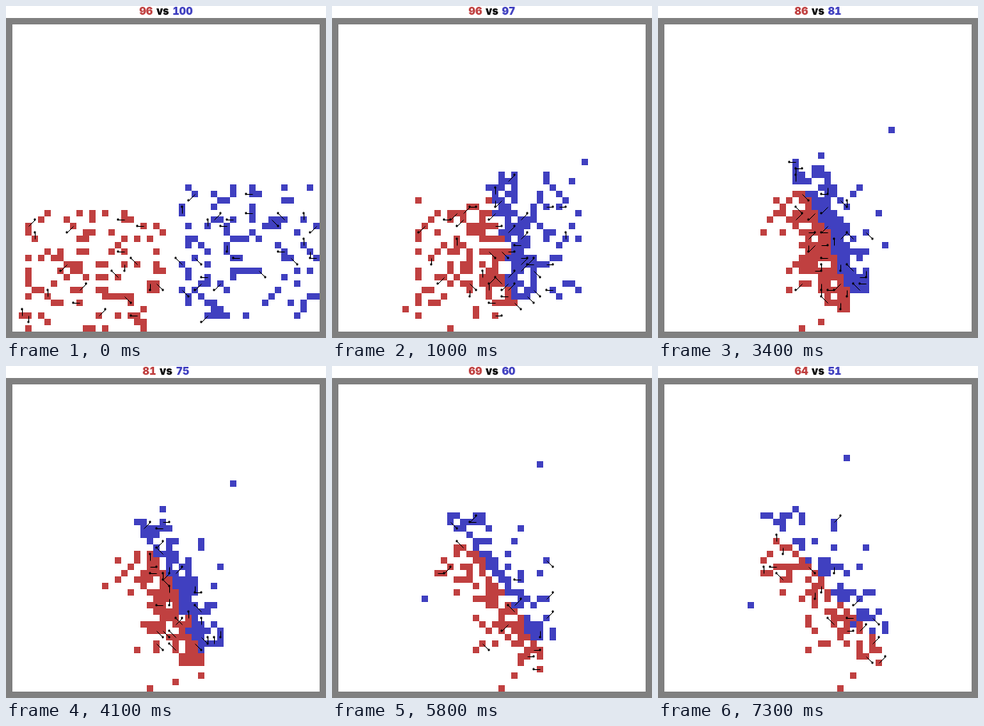
An HTML page for the animation above (7.4 s loop, 400 by 415 pixels).

```html
<!DOCTYPE html>
<html lang="en">
<head>
<meta charset="utf-8">
<title>Red vs blue</title>
<style>
  html, body { margin: 0; width: 100%; height: 100%; overflow: hidden; background: #fff; }
  svg { display: block; width: 100%; height: 100%; }
  text { font: 900 13px Inter, "Liberation Sans", sans-serif; font-variant-numeric: tabular-nums; word-spacing: 1px; }
  .red { fill: #c04040; }
  .blue { fill: #4040c0; }
</style>
</head>
<body>
<svg viewBox="0 0 400 415">
  <text x="200" y="11" text-anchor="middle"><tspan id="redCount" class="red"></tspan> vs <tspan id="blueCount" class="blue"></tspan></text>
  <path d="M0 15H400V415H0ZM8 23V407H392V23Z" fill="#808080" shape-rendering="crispEdges"/>
  <g shape-rendering="crispEdges">
    <path id="red" class="red"/>
    <path id="blue" class="blue"/>
  </g>
  <path id="sticks" fill="none" stroke="#000"/>
  <path id="tips" fill="none" stroke="#000" stroke-width="2.8" stroke-linecap="round"/>
</svg>
<script>
const STEP = 100, STEPS = 74, SIZE = 48, CELL = 8, LEFT = 8, TOP = 23;
const KEYS = [0, 10, 21, 34, 49, 58, 73];

// Starting areas are in cells; counts are the survivors at each key step.
const TEAMS = [
  { id: 'red', side: 1, area: [1, 29, 23, 19], counts: [96, 96, 90, 86, 75, 69, 64] },
  { id: 'blue', side: -1, area: [26, 25, 22, 21], counts: [100, 97, 91, 81, 68, 60, 51] }
];

let seed = 20117;
function rand() {
  seed = (seed + 0x6d2b79f5) | 0;
  let v = Math.imul(seed ^ (seed >>> 15), 1 | seed);
  v = (v + Math.imul(v ^ (v >>> 7), 61 | v)) ^ v;
  return ((v ^ (v >>> 14)) >>> 0) / 4294967296;
}
const pick = n => Math.floor(rand() * n);

const taken = new Set();
const key = (x, y) => y * SIZE + x;

function deploy(team) {
  const [x0, y0, w, h] = team.area;
  team.units = [];
  while (team.units.length < team.counts[0]) {
    const x = x0 + pick(w), y = y0 + pick(h);
    if (taken.has(key(x, y))) continue;
    taken.add(key(x, y));
    // Position along the battle line (-1 top, 1 bottom) and cells behind it.
    const along = (y - 25 + rand()) / 11.5 - 1;
    const depth = 0.3 - 2.2 * Math.log(1 - rand());
    team.units.push({ x, y, side: team.side, along, depth });
  }
}

// The battle line is a shallow bow that turns and lengthens around its centre.
function goal({ side, along, depth }, step) {
  const angle = (11 + 0.42 * step) * Math.PI / 180;
  const reach = along * (82 + 0.5 * step);
  const off = side * depth * CELL - 10 * (1 - along * along);
  const x = 204 + reach * Math.sin(angle) - off * Math.cos(angle);
  const y = 303 - 0.37 * step + reach * Math.cos(angle) + off * Math.sin(angle);
  return [(x - LEFT) / CELL - 0.5, (y - TOP) / CELL - 0.5];
}

function move(unit, step) {
  const [gx, gy] = goal(unit, step);
  taken.delete(key(unit.x, unit.y));
  let best = Infinity, spot;
  for (let dy = -1; dy <= 1; dy++) {
    for (let dx = -1; dx <= 1; dx++) {
      const x = unit.x + dx, y = unit.y + dy;
      if (x < 0 || y < 0 || x >= SIZE || y >= SIZE || taken.has(key(x, y))) continue;
      const cost = Math.hypot(gx - x, gy - y) + rand() * 0.7;
      if (cost < best) { best = cost; spot = [x, y]; }
    }
  }
  [unit.x, unit.y] = spot;
  taken.add(key(unit.x, unit.y));
}

function survivors(counts, step) {
  const i = KEYS.findIndex(k => k >= step);
  const k = (step - KEYS[i - 1]) / (KEYS[i] - KEYS[i - 1]);
  return Math.round(counts[i - 1] + (counts[i] - counts[i - 1]) * k);
}

function cull(team, step) {
  const alive = survivors(team.counts, step);
  while (team.units.length > alive) {
    const [dead] = team.units.splice(1 + pick(team.units.length - 1), 1);
    taken.delete(key(dead.x, dead.y));
  }
}

function snapshot() {
  const shot = { sticks: '', tips: '' };
  for (const team of TEAMS) {
    shot[team.id] = '';
    shot[team.id + 'Count'] = team.units.length;
    for (const { x, y } of team.units) {
      const px = LEFT + x * CELL, py = TOP + y * CELL;
      shot[team.id] += `M${px} ${py}h8v8h-8z`;
      if (rand() > 0.22) continue;
      const turn = pick(8) * Math.PI / 4;
      const dx = Math.round(Math.cos(turn)) * CELL, dy = Math.round(Math.sin(turn)) * CELL;
      shot.sticks += `M${px + 4.5} ${py + 4.5}l${dx} ${dy}`;
      shot.tips += `M${px + 4 + dx} ${py + 4 + dy}h.01`;
    }
  }
  return shot;
}

TEAMS.forEach(deploy);
// One blue unit slips through and stays behind the red side.
Object.assign(TEAMS[1].units[0], { along: -0.4, depth: -11 });

const shots = [snapshot()];
for (let step = 1; step < STEPS; step++) {
  TEAMS.forEach(team => cull(team, step));
  const order = TEAMS.flatMap(team => team.units).map(unit => [rand(), unit]);
  order.sort((a, b) => a[0] - b[0]).forEach(([, unit]) => move(unit, step));
  shots.push(snapshot());
}

const el = id => document.getElementById(id);
let shown = -1;
function render(time) {
  const step = Math.floor(time / STEP) % STEPS;
  if (step === shown) return;
  shown = step;
  const shot = shots[step];
  for (const id of ['red', 'blue', 'sticks', 'tips']) el(id).setAttribute('d', shot[id]);
  for (const id of ['redCount', 'blueCount']) el(id).textContent = shot[id];
}

const start = performance.now();
function tick() {
  render(performance.now() - start);
  requestAnimationFrame(tick);
}
tick();
</script>
</body>
</html>
```
